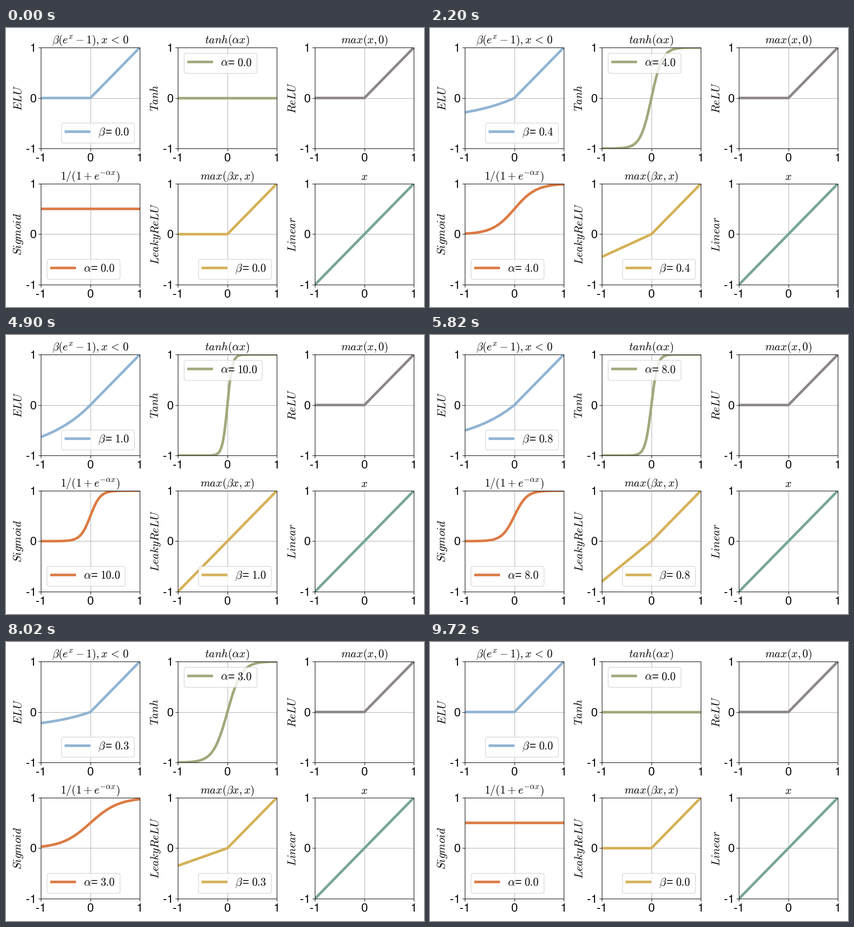
Write a matplotlib script that moves like this. It is 900 px wide and 600 px high and loops after 9.82 s.

```python
import numpy as np
import matplotlib.pyplot as plt
from matplotlib.animation import FuncAnimation
from matplotlib.patches import FancyBboxPatch, Polygon, Rectangle

plt.rcParams["font.family"] = "Liberation Sans"
plt.rcParams["mathtext.fontset"] = "cm"

W, H, DPI = 900, 600, 100
STEP, LOOP = 20, 9820            # ms
PEAK = 49                        # index of the largest parameter value

PANEL_W, PANEL_H = 213, 217.2
LEFTS = [75.2, 370.2, 665.2]
TOPS = [41.95, 334.8]
EM = 25                          # 18 pt in pixels
TICK = 4.86
BOX_W, BOX_H, EXTRA_DIGIT = 157, 43, 11.5

# Footless "1" and its minus sign, in em units from the baseline
ONE = np.array([(.259, .505), (.259, 0), (.347, 0), (.347, .709), (.289, .709),
                (.270, .645), (.235, .598), (.180, .577), (.102, .568),
                (.102, .505)])
DASH = np.array([(.046, .234), (.284, .234), (.284, .322), (.046, .322)])
DIGIT_W, DASH_W = .556, .333

x = np.linspace(-1, 1, 201)

# title, label, colour, legend (symbol, right side, top side), curve(alpha, beta)
PANELS = [
    (r"$\beta(e^x-1), x\,<\,0$", "ELU", "#91b4d2", (r"\beta", True, False),
     lambda a, b: np.where(x < 0, b * (np.exp(x) - 1), x)),
    (r"$tanh(\alpha x)$", "Tanh", "#a2a87b", (r"\alpha", False, True),
     lambda a, b: np.tanh(a * x)),
    (r"$max(x,0)$", "ReLU", "#8e878a", None,
     lambda a, b: np.maximum(x, 0)),
    (r"$1/(1+e^{-\alpha x})$", "Sigmoid", "#dc7b45", (r"\alpha", False, False),
     lambda a, b: 1 / (1 + np.exp(-a * x))),
    (r"$max(\beta x,x)$", "LeakyReLU", "#d5b158", (r"\beta", True, False),
     lambda a, b: np.maximum(b * x, x)),
    (r"$x$", "Linear", "#79a598", None,
     lambda a, b: x),
]

fig = plt.figure(figsize=(W / DPI, H / DPI), dpi=DPI, facecolor="white")
ax = fig.add_axes([0, 0, 1, 1])
ax.set_xlim(0, W)
ax.set_ylim(H, 0)
ax.axis("off")


def segments(parts, color, z):
    """Thin straight lines, all in one artist."""
    xs, ys = [], []
    for x0, y0, x1, y1 in parts:
        xs += [x0, x1, np.nan]
        ys += [y0, y1, np.nan]
    ax.plot(xs, ys, color=color, lw=0.8, zorder=z, snap=True)


def text(px, py, s, size=18, ha="center", z=3, **kw):
    return ax.text(px, py, s, fontsize=size, ha=ha, va="baseline",
                   color="black", zorder=z, **kw)


def glyph(px, py, shape):
    ax.add_patch(Polygon(shape * (EM, -EM) + (px, py), fc="black", lw=0,
                         zorder=3))


def tick_label(px, py, name, align):
    """Label whose start is shifted left by the share `align` of its width."""
    dash = DASH_W * EM if name[0] == "-" else 0
    px -= align * (dash + DIGIT_W * EM)
    if dash:
        glyph(px, py, DASH)
    if name[-1] == "1":
        glyph(px + dash, py, ONE)
    else:
        text(px, py, name, ha="left")


class Legend:
    def __init__(self, left, top, color, symbol, at_right, at_top):
        self.is_alpha = symbol == r"\alpha"
        pad = 12.4
        bx = left + PANEL_W - pad - BOX_W if at_right else left + pad
        by = top + pad if at_top else top + PANEL_H - pad - BOX_H
        self.box = FancyBboxPatch(
            (bx, by), BOX_W, BOX_H, boxstyle="round,pad=0,rounding_size=5",
            fc="white", ec="#cccccc", alpha=0.8, lw=1, zorder=5, snap=True)
        ax.add_patch(self.box)
        ax.plot([bx + 10, bx + 60], [by + 19, by + 19], color=color, lw=4,
                zorder=5.1)
        base = by + 27.2
        text(bx + 79.5, base, f"${symbol}$", 17.5, "left", 5.2)
        text(bx + 95, base, "=", 18, "left", 5.2)
        self.number = text(bx + 115, base, "", 17, "left", 5.2)

    def update(self, alpha, beta):
        value = round(alpha) if self.is_alpha else beta
        label = f"{value:.1f}"
        self.number.set_text(f"${label}$")
        self.box.set_width(BOX_W + EXTRA_DIGIT * (len(label) - 3))


def draw_frame(left, top, title, label):
    right, bottom = left + PANEL_W, top + PANEL_H
    cx, cy = (left + right) / 2, (top + bottom) / 2
    segments([(cx, top, cx, bottom), (left, cy, right, cy)], "#b0b0b0", 1.5)
    edges = [(left, top, right, top), (left, bottom, right, bottom),
             (left, top, left, bottom), (right, top, right, bottom)]
    for px, py, name in zip((left, cx, right), (bottom, cy, top),
                            ("-1", "0", "1")):
        edges += [(px, bottom, px, bottom + TICK), (left - TICK, py, left, py)]
        tick_label(px, bottom + 27.8, name, 0.5)
        tick_label(left - 2 * TICK, py + 9, name, 1)
    segments(edges, "black", 2.5)
    text(cx, top - 8.1, title, 17.2)
    text(left - 41.7, cy, f"${label}$", 17.5, rotation=90,
         rotation_mode="anchor")


curves, legends = [], []
for i, (title, label, color, legend, func) in enumerate(PANELS):
    left, top = LEFTS[i % 3], TOPS[i // 3]
    draw_frame(left, top, title, label)
    line, = ax.plot([], [], color=color, lw=4, zorder=2)
    line.set_clip_path(Rectangle((left, top + PANEL_H), PANEL_W, -PANEL_H,
                                 transform=ax.transData))
    curves.append((line, left, top, func))
    if legend:
        legends.append(Legend(left, top, color, *legend))


def level(t):
    """Parameter index: up in 100 ms steps, a short peak, then back down."""
    if t < 4900:
        return t // 100
    if t < 4920:
        return PEAK
    return PEAK - 1 - (t - 4920) // 100


def update(n):
    beta = level(n * STEP) / PEAK
    alpha = 10 * beta
    for line, left, top, func in curves:
        line.set_data(left + (x + 1) / 2 * PANEL_W,
                      top + (1 - func(alpha, beta)) / 2 * PANEL_H)
    for legend in legends:
        legend.update(alpha, beta)
    return []


anim = FuncAnimation(fig, update, frames=LOOP // STEP, interval=STEP,
                     repeat=True, repeat_delay=0)
plt.show()
```
